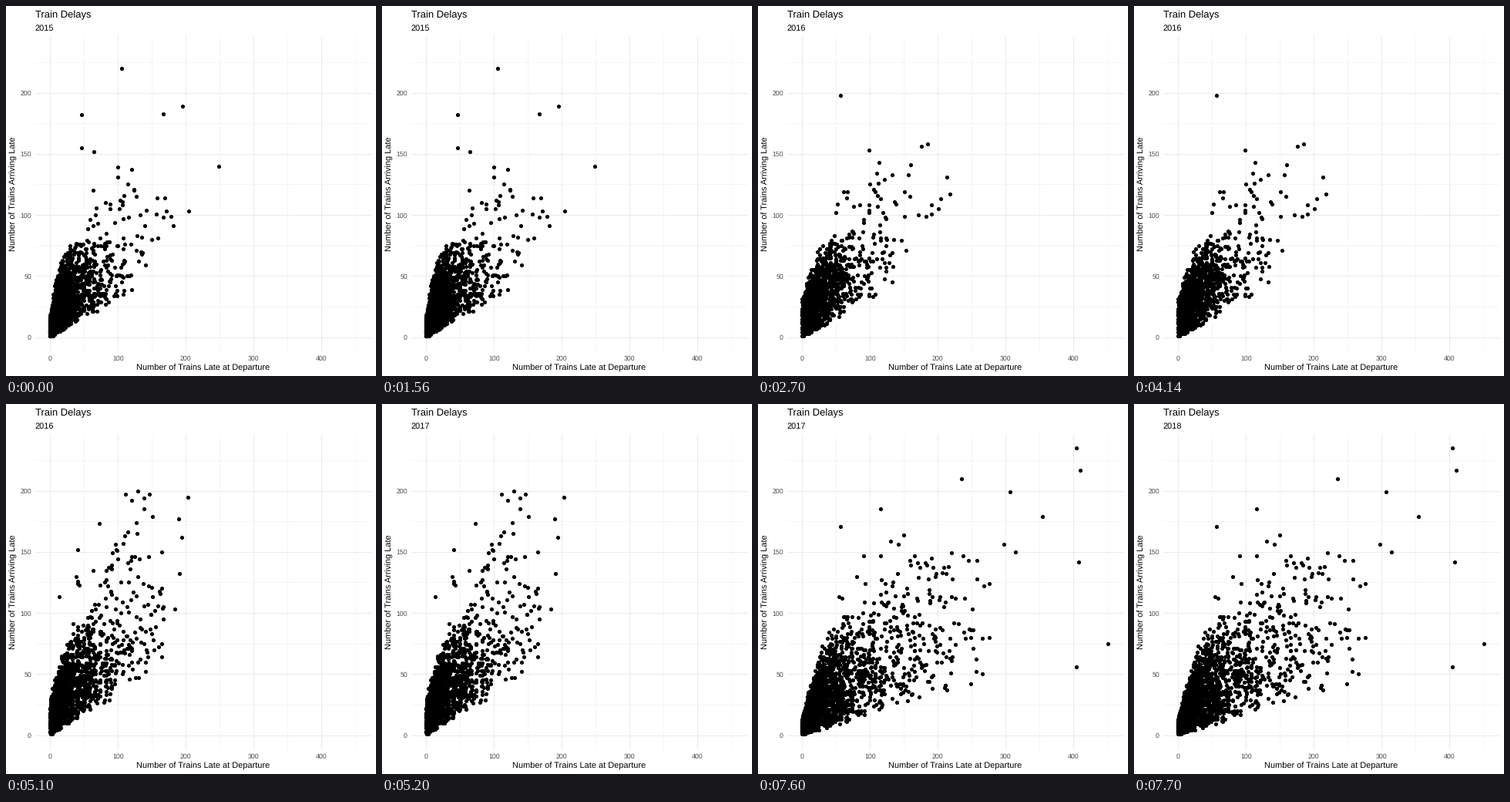
These frames come from a looping animation (480 by 480 pixels, 10000 ms). A matplotlib script:

```python
import numpy as np
import matplotlib.pyplot as plt
from matplotlib.animation import FuncAnimation

plt.rcParams["font.family"] = "Liberation Sans"
plt.rcParams["text.hinting"] = "none"

SIZE, DPI = 480, 80
PX = 72 / DPI                 # points per pixel
X0, Y0 = 57.4, 429.6          # stage position of the data origin
SX, SY = 0.8796, 1.585        # pixels per train
LEFT, RIGHT, TOP, BOTTOM = 37.6, 473.8, 38.5, 448.2
FRAME_MS, FRAMES = 100, 100
SWITCHES = (26, 51, 76)       # frames at which the next year's points appear


def to_stage(x, y):
    return X0 + np.asarray(x) * SX, Y0 - np.asarray(y) * SY


def year_points(seed, n, near, wide, edge, slope, reach, loose, peaks):
    """Dense fan of small stations, a loose halo, and the few extreme ones.

    near, wide: mean departures delayed at small and large stations
    edge: start, rise and pace of the fan's upper limit; slope: its lower limit
    loose: count, mean x, spread x, mean y, spread y of the halo
    """
    rng = np.random.default_rng(seed)
    start, rise, pace = edge
    x = rng.exponential(np.where(rng.random(n) < 0.6, near, wide))
    x = x[x < reach]
    low = slope * x
    high = np.maximum(start + rise * (1 - np.exp(-x / pace)), low)
    y = low + (high - low) * rng.beta(1.6, 2.6, x.size)
    fan = np.column_stack([x, y])

    count, mx, dx, my, dy = loose
    halo = rng.normal((mx, my), (dx, dy), (count, 2))
    halo = halo[(halo[:, 0] > 12) & (halo[:, 1] > 0.45 * halo[:, 0])]
    return np.rint(np.vstack([fan, halo, peaks]))


YEARS = [
    year_points(15, 1900, 14, 32, (18, 75, 15), 0.3, 140,
                (50, 115, 45, 102, 20),
                [(105, 220), (46, 182), (46, 155), (64, 152),
                 (167, 183), (195, 189), (248, 140), (204, 103)]),
    year_points(16, 1450, 18, 36, (32, 70, 25), 0.3, 150,
                (55, 115, 50, 102, 20),
                [(56, 198), (98, 153), (176, 156), (185, 158),
                 (113, 143), (160, 141), (218, 117), (201, 105)]),
    year_points(17, 1700, 19, 48, (32, 98, 35), 0.33, 165,
                (65, 112, 36, 132, 24),
                [(129, 200), (146, 197), (138, 194), (120, 192),
                 (203, 195), (189, 177), (194, 162), (191, 132)]),
    year_points(18, 2000, 26, 80, (14, 115, 38), 0.16, 280,
                (90, 195, 75, 122, 26),
                [(404, 235), (410, 217), (235, 210), (306, 199),
                 (354, 179), (408, 142), (451, 75), (404, 56)]),
]

fig = plt.figure(figsize=(SIZE / DPI, SIZE / DPI), dpi=DPI, facecolor="white")
ax = fig.add_axes([0, 0, 1, 1])
ax.set_xlim(0, SIZE)
ax.set_ylim(SIZE, 0)
ax.axis("off")


def label(x, y, text, size, **style):
    return ax.text(x, y, text, fontsize=size * PX,
                   **{"color": "black", "va": "baseline", **style})


def grid(xs, ys, width):
    style = dict(color="#EBEBEB", lw=width * PX, zorder=1)
    for y in to_stage(0, ys)[1]:
        ax.plot([LEFT, RIGHT], [y, y], **style)
    for x in to_stage(xs, 0)[0]:
        ax.plot([x, x], [TOP, BOTTOM], **style)


grid(range(50, 451, 100), range(25, 226, 50), 0.53)
grid(range(0, 401, 100), range(0, 201, 50), 1.07)

for v in range(0, 401, 100):
    label(X0 + v * SX, 460.2, str(v), 8.8, color="#4D4D4D", ha="center")
for v in range(0, 201, 50):
    label(33, Y0 - v * SY + 3.4, str(v), 8.8, color="#4D4D4D", ha="right")

label(37.8, 15.3, "Train Delays", 13)
subtitle = label(37.8, 31.8, "2015", 11)
label(255.9, 473.2, "Number of Trains Late at Departure", 11, ha="center")
label(13.2, 243.7, "Number of Trains Arriving Late", 11, rotation=90,
      ha="center", rotation_mode="anchor")

points, = ax.plot([], [], "o", color="black", ms=5.2 * PX, mew=0, zorder=2)


def draw(frame):
    shown = sum(frame >= s for s in SWITCHES)
    named = sum(frame > s for s in SWITCHES)   # the year label lags one frame
    points.set_data(*to_stage(*YEARS[shown].T))
    subtitle.set_text(str(2015 + named))
    return points, subtitle


anim = FuncAnimation(fig, draw, frames=FRAMES, interval=FRAME_MS,
                     repeat=True, repeat_delay=0)
plt.show()
```
